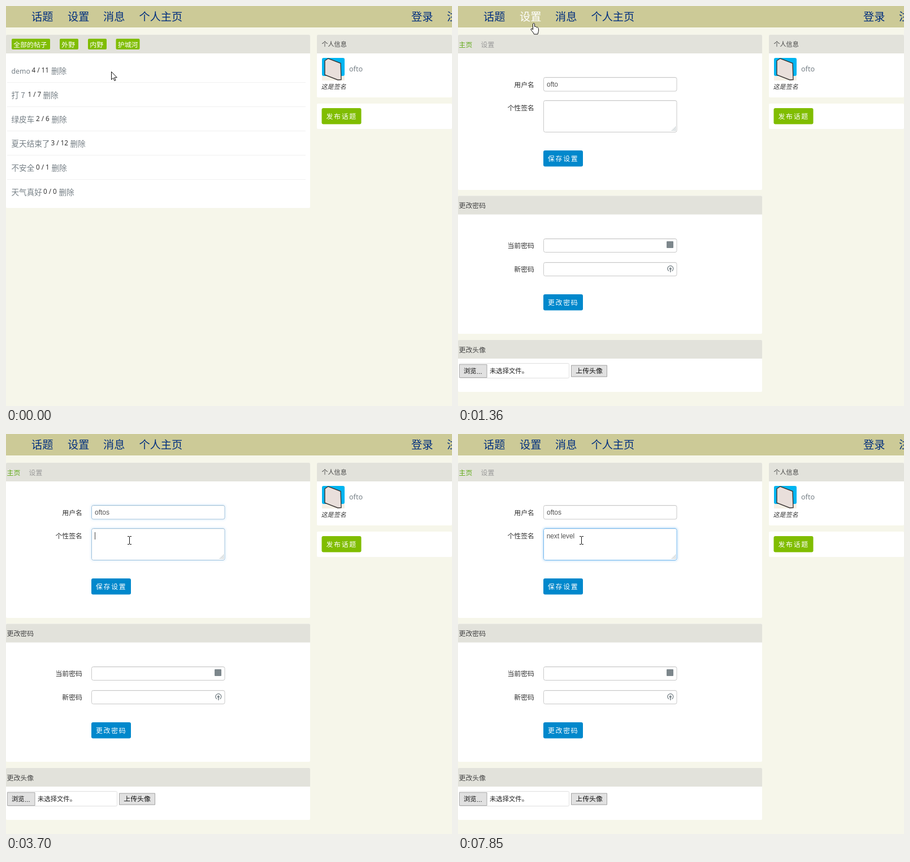
Write an HTML page with a canvas that moves like this. It is 789 by 709 pixels and loops after 8000 ms.

```html
<!DOCTYPE html>
<html lang="zh-CN">
<head>
<meta charset="utf-8">
<title>设置</title>
<style>
html, body { margin: 0; width: 100%; height: 100%; overflow: hidden; background: #f6f6ea; }
canvas { display: block; }
</style>
</head>
<body>
<canvas id="stage" width="789" height="709"></canvas>
<script>
const LOOP = 8000;
const ctx = document.getElementById('stage').getContext('2d');
const CJK = '"Noto Sans CJK SC", "Noto Sans CJK", sans-serif';
const UI = '"Noto Sans", "Open Sans", sans-serif';
const ARIAL = '"Liberation Sans", sans-serif';
const INK = '#333', SOFT = '#778087', NAVY = '#002f7f', GREEN = '#80bd01', BLUE = '#0088cc';

// Pointer: [time, x, y, kind]; each place is held until the next one
const POINTER = [
  [0, 186, 116, 'arrow'], [70, 190, 113, 'arrow'], [140, 191, 106, 'arrow'],
  [210, 181, 90, 'arrow'], [290, 167, 70, 'arrow'], [360, 152, 51, 'arrow'],
  [430, 141, 38, 'arrow'], [510, 132, 30, 'hand'], [580, 130, 28, 'hand'],
  [810, 132, 28, 'hand'], [1360, 133, 30, 'hand'], [1430, 138, 40, 'arrow'],
  [1510, 146, 56, 'arrow'], [1590, 157, 76, 'arrow'], [1670, 170, 97, 'arrow'],
  [1740, 181, 114, 'arrow'], [1820, 188, 127, 'beam'], [1910, 192, 132, 'beam'],
  [1990, 194, 136, 'beam'], [2060, 194, 138, 'beam'], [2840, 197, 134, 'beam'],
  [2920, 200, 131, 'beam'], [3230, 210, 162, 'beam'], [3300, 218, 188, 'beam']
];
// Signature typing: [time, letters shown, caret visible]
const TYPING = [
  [3620, 0, 1], [4170, 0, 0], [4720, 0, 1], [4870, 1, 1], [4960, 2, 1], [5190, 2, 0],
  [5430, 3, 1], [5750, 3, 0], [5980, 4, 1], [6130, 5, 1], [6300, 5, 0], [6600, 6, 1],
  [6760, 7, 1], [6850, 7, 0], [7070, 8, 1], [7150, 9, 1], [7380, 10, 0],
  [7620, 11, 1], [7850, 11, 0]
];
const SIGNATURE = 'next level ';

const at = (keys, t) => keys.filter(k => k[0] <= t).pop();
const fade = (t, start) => Math.max(0, Math.min(1, (Math.floor((t - start) / 76) + 1) / 4));

function rect(x, y, w, h, color, r = 0) {
  ctx.fillStyle = color;
  ctx.beginPath();
  ctx.roundRect(x, y, w, h, r);
  ctx.fill();
}

function frame(x, y, w, h, color, r = 0) {
  ctx.strokeStyle = color;
  ctx.lineWidth = 1;
  ctx.beginPath();
  ctx.roundRect(x + .5, y + .5, w - 1, h - 1, r);
  ctx.stroke();
}

function text(str, x, y, size, color, family = UI, gap = 0) {
  ctx.font = size + 'px ' + family;
  ctx.letterSpacing = gap + 'px';
  ctx.fillStyle = color;
  ctx.fillText(str, x, y);
}

// Chinese text centred vertically on y
function han(str, x, y, size, color, gap = 0, weight = 400) {
  ctx.font = `${weight} ${size}px ${CJK}`;
  ctx.letterSpacing = gap + 'px';
  ctx.fillStyle = color;
  ctx.fillText(str, x, y + size * .38);
}

function poly(points, fill, stroke, width = 1) {
  ctx.beginPath();
  points.forEach(p => ctx.lineTo(p[0], p[1]));
  ctx.closePath();
  ctx.fillStyle = fill;
  ctx.fill();
  ctx.strokeStyle = stroke;
  ctx.lineWidth = width;
  ctx.stroke();
}

function panel(x, y, w, bottom) {
  rect(x, y, w, bottom - y, '#fff', 2);
  rect(x, y, w, 33, '#e2e2db', [2, 2, 0, 0]);
}

function bigButton(label, x, y, color) {
  rect(x, y, 70, 28.5, color, 3);
  han(label, x + 8, y + 14.5, 11.9, '#fff', 1.7, 500);
}

function plainButton(label, x, y) {
  rect(x, y, 58.5, 22.5, '#e6eef2');
  han(label, x + 6.5, y + 11, 11.33, '#111');
}

function nav(hover) {
  rect(0, 0, 789, 38, '#ccca97');
  [['话题', 45], ['设置', 109], ['消息', 172], ['个人主页', 235.5], ['登录', 717], ['注册', 780]]
    .forEach(([s, x]) => han(s, x, 18.7, 19.2, hover && x === 109 ? '#fff' : NAVY));
}

function avatar() {
  rect(559, 92, 40, 40, '#f5f0e6');
  rect(559, 92, 40, 32, '#00b5f1', 3);
  poly([[564, 97], [570, 93], [592, 101.5], [593, 130.5], [587, 131], [564, 122]], '#e9dfdb', '#3b3635', 1.4);
}

function sidebar(styled) {
  panel(550, 51, 239, 162);
  han('个人信息', 558.5, 67.5, 11.05, '#444');
  avatar();
  text('ofto', 607, 116, 12.6, SOFT);
  ctx.save();
  ctx.transform(1, 0, -.22, 1, 143 * .22, 0);
  han('这是签名', 558.5, 143, 11.05, INK);
  ctx.restore();
  rect(550, 173, 239, styled ? 45 : 43, '#fff', 2);
  if (styled) bigButton('发布话题', 558.5, 181, GREEN);
  else han('发布话题', 558.5, 195.5, 13.6, '#1a1ae6');
}

function topics() {
  panel(0, 51, 538, 358);
  [['全部的帖子', 10, 68], ['外野', 95, 33], ['内野', 145, 33], ['护城河', 194.5, 42]].forEach(([s, x, w]) => {
    rect(x, 58, w, 19, GREEN, 2);
    han(s, x + 3.3, 68, 11.9, '#fff', 0, 500);
  });
  [['demo', '4 / 11', 45.5, 80], ['打 7', '1 / 7', 38.5, 65.5], ['绿皮车', '2 / 6', 53, 80.5],
   ['夏天结束了', '3 / 12', 79.5, 113.5], ['不安全', '0 / 1', 53, 80.5], ['天气真好', '0 / 0', 66, 93.5]]
    .forEach(([title, count, cx, dx], i) => {
      const y = 115 + i * 43;
      if (i === 0) text(title, 9.5, y + 5, 12.3, SOFT);
      else han(title, 9.5, y, 13.6, SOFT);
      text(count, cx, y + 3.2, 11.7, INK);
      han('删除', dx, y, 13.6, SOFT);
      if (i < 5) rect(2, 135 + i * 43, 528, 1, '#f0f0f0');
    });
}

function field(y, h, focus = 0) {
  const mix = (a, b) => Math.round(a + (b - a) * focus);
  if (focus) {
    ctx.save();
    ctx.shadowColor = `rgba(82,168,236,${focus * .6})`;
    ctx.shadowBlur = 4;
    rect(151, y, 236.5, h, '#fff', 3);
    ctx.restore();
  }
  rect(151, y, 236.5, h, '#fff', 3);
  rect(152, y + 1, 234.5, 1, '#f2f2f2');
  frame(151, y, 236.5, h, `rgb(${mix(200, 117)},${mix(200, 185)},${mix(200, 239)})`, 3);
}

function label(str, y) {
  han(str, 135 - str.length * 11.9, y, 11.9, INK);
}

function caret(x, y) {
  rect(Math.round(x), y, 1, 13, '#444');
}

function resizer() {
  for (let i = 0; i < 4; i++)
    for (let j = 0; j <= i; j++)
      rect(378 + i * 2, 220 - j * 2, 1, 1, '#8a9ba0');
}

function keyIcon(y) {
  ctx.strokeStyle = '#818b90';
  ctx.lineWidth = 1.4;
  ctx.beginPath();
  ctx.arc(375.8, y, 5, Math.PI * .68, Math.PI * 2.32);
  ctx.stroke();
  rect(373.8, y - 2, 4, 4, '#818b90', 1.5);
  rect(375, y, 1.6, 6.5, '#818b90');
}

function profileForm(t, styled) {
  panel(0, 51, 538, styled ? 326 : 322);
  han('主页', 1.5, 68, 11.9, '#5fa916');
  han('设置', 40.5, 68, 11.9, '#999');
  label('用户名', 139);
  label('个性签名', 180.5);

  const leave = fade(t, 3620);
  field(126, 25.5, fade(t, 2140) - leave);
  field(167, 57, leave);
  resizer();
  const typed = t >= 3160;
  text(typed ? 'oftos' : 'ofto', 157, 143, 12, '#555', ARIAL);
  if (t >= 2140 && t < 2690) caret(177, 132);
  if (t >= 3160 && t < 3620) caret(183, 132);

  const state = at(TYPING, t);
  if (state) {
    const shown = SIGNATURE.slice(0, state[1]);
    text(shown, 156.8, 185, 12, '#555', ARIAL, -.15);
    if (state[2]) caret(156.8 + ctx.measureText(shown).width, 174);
  }
  if (styled) bigButton('保存设置', 151, 256, BLUE);
  else plainButton('保存设置', 151, 257.5);
}

function passwordForm(styled) {
  const d = styled ? 4 : 0;
  panel(0, 332.5 + d, 538, styled ? 581 : 573.5);
  han('更改密码', 1.5, 349 + d, 11.9, '#444');
  label('当前密码', 420 + d);
  label('新密码', 462 + d);
  field(408 + d, 25, 0);
  field(450 + d, 25, 0);
  rect(369, 413 + d, 12, 12, '#7d878c', 1);
  keyIcon(461.5 + d);
  if (styled) bigButton('更改密码', 151, 511, BLUE);
  else plainButton('更改密码', 151, 509);
}

function avatarForm(styled) {
  const d = styled ? 8 : 0;
  panel(0, 584.5 + d * .94, 538, 676 + d);
  han('更改头像', 1.5, 601 + d, 11.9, '#444');
  frame(2, 625 + d, 195, 27, '#dfdfdf', 2);
  rect(2, 627 + d, 49.5, 24, '#e1e1e1');
  frame(2, 627 + d, 49.5, 24, '#adadad');
  han('浏览', 10, 639 + d, 11.33, '#111');
  text('...', 33, 643.5 + d, 11.5, '#111', ARIAL);
  han('未选择文件。', 56, 639 + d, 11.33, '#222');
  rect(200, 628.5 + d, 64, 21, '#e1e1e1');
  frame(200, 628.5 + d, 64, 21, '#a5a5a5');
  han('上传头像', 208.3, 638.7 + d, 11.9, '#111');
}

const shapes = {
  arrow: [[0, 0], [0, 14], [3.2, 11], [5.5, 16], [7.5, 15], [5.3, 10.3], [9.8, 10.3]],
  hand: [[-1, 1], [.5, 0], [2, 1], [2, 6], [4, 6], [5, 7], [7, 7], [8, 8], [9, 10], [9, 14],
    [7.5, 19.5], [1, 19.5], [-.5, 16.5], [-4.5, 11.5], [-4, 9.7], [-2.5, 9.7], [-1, 11.5]]
};

function pointer(x, y, kind) {
  if (kind !== 'beam') {
    poly(shapes[kind].map(p => [x + p[0] + .5, y + p[1] + .5]), '#fff', '#111');
    return;
  }
  rect(x, y - 6, 1, 13, '#111');
  for (const dy of [-7, 7]) {
    rect(x - 3, y + dy, 3, 1, '#111');
    rect(x + 1, y + dy, 3, 1, '#111');
  }
}

function draw(t) {
  rect(0, 0, 789, 709, '#f6f6ea');
  const styled = t < 1280 || t >= 1360;
  nav(t >= 510 && t < 1430);
  sidebar(styled);
  if (t < 1280) topics();
  else {
    profileForm(t, styled);
    passwordForm(styled);
    avatarForm(styled);
  }
  const [, x, y, kind] = at(POINTER, t);
  pointer(x, y, kind);
}

const start = performance.now();
function tick() {
  draw((performance.now() - start) % LOOP);
  requestAnimationFrame(tick);
}
tick();
</script>
</body>
</html>
```
